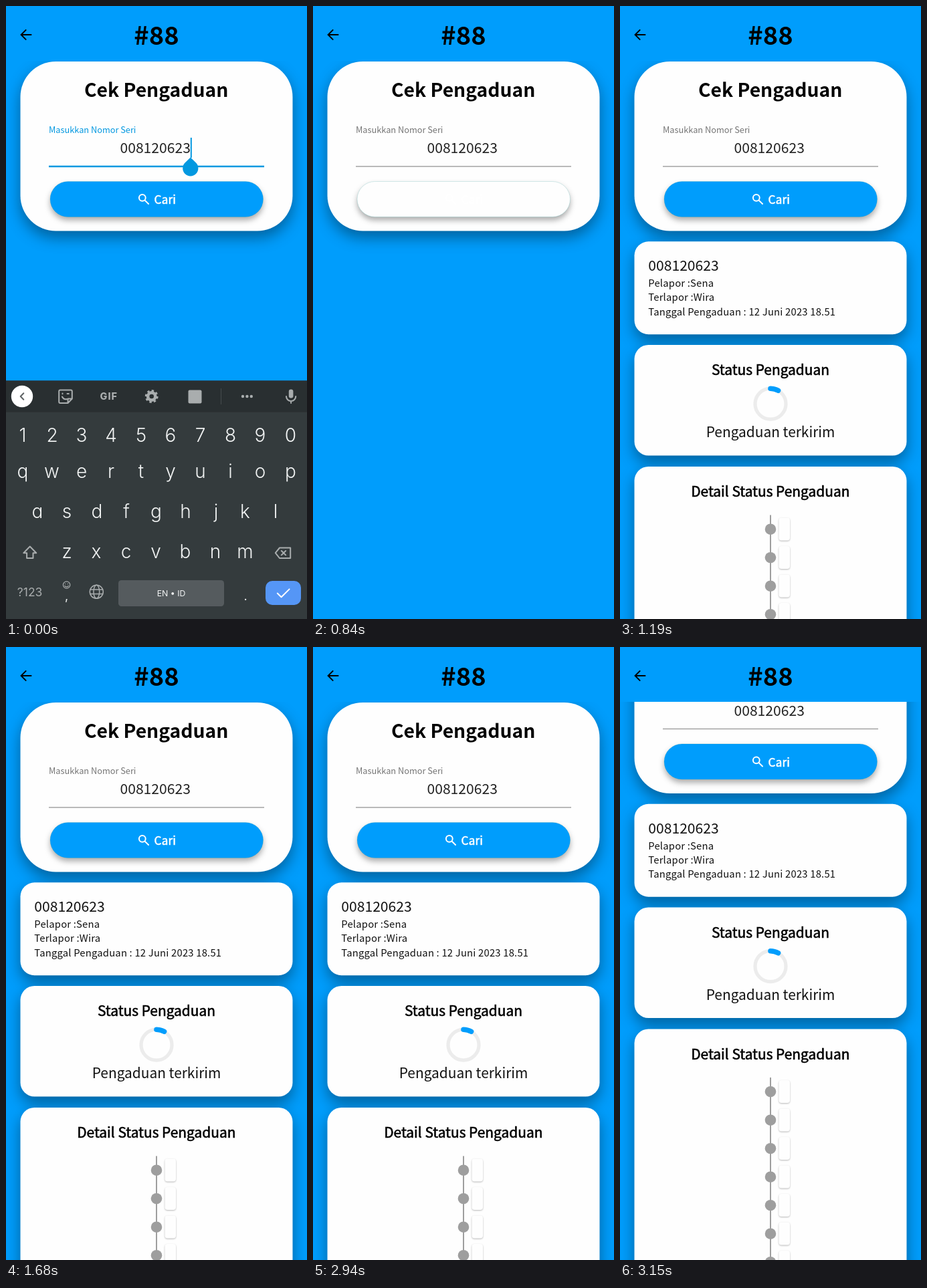
These frames come from a looping animation (450x917 px, 3.22 s). An HTML page:

```html
<!DOCTYPE html>
<html lang="id">
<head>
<meta charset="utf-8">
<title>Cek Pengaduan</title>
<style>
  :root {
    --blue: #009dfc;
    --accent: #0398e0;
    --card: #fefefe;
    --icon: #a9adae;
    --loop: 3220ms linear infinite;
  }
  html, body { margin: 0; width: 100%; height: 100%; overflow: hidden; background: var(--blue); }
  svg.stage { display: block; width: 100vw; height: 100vh; }
  text { font-family: "Noto Sans CJK JP", "Noto Sans CJK SC", "Noto Sans CJK KR", "Noto Sans CJK TC", "Noto Sans", sans-serif; fill: #111; }
  .mid { text-anchor: middle; }
  .bold { font-weight: 700; fill: #000; }
  .semi { stroke: #000; stroke-width: .6px; fill: #000; }
  .h { font-size: 20.9px; }
  .num { font-size: 21.1px; }
  .row { font-size: 14.8px; letter-spacing: .2px; }
  .line { fill: none; stroke-linecap: round; stroke-linejoin: round; }
  .card { fill: var(--card); filter: url(#deep); }

  .keys text { font-family: Inter, Roboto, sans-serif; font-feature-settings: "cv11"; fill: #f1f3f3; text-anchor: middle; }
  .keys .big { font-size: 28px; font-weight: 300; }
  .ico { fill: none; stroke: var(--icon); stroke-width: 2; stroke-linecap: round; stroke-linejoin: round; }
  .solid { fill: var(--icon); }

  .caret { animation: caret var(--loop); }
  .label { font-size: 12.75px; animation: label var(--loop); }
  .under { animation: under var(--loop); }
  .button { animation: button var(--loop); }
  .ripple { fill: #fff; animation: ripple var(--loop); }
  .keys { animation: slide var(--loop); }
  .results { animation: results var(--loop); }
  .page { animation: scroll var(--loop); }

  @keyframes caret {
    0%, 17.38% { visibility: visible; }
    17.39%, 100% { visibility: hidden; }
  }
  @keyframes label {
    0%, 21.74% { fill: var(--accent); }
    26.08%, 100% { fill: #757575; }
  }
  @keyframes under {
    0%, 21.74% { stroke: var(--accent); stroke-width: 2.4px; }
    26.08%, 100% { stroke: #a2a2a2; stroke-width: 1.6px; }
  }
  @keyframes button {
    0%, 21.74% { fill: var(--blue); }
    26.08%, 36.94% { fill: var(--card); }
    36.95%, 100% { fill: var(--blue); }
  }
  @keyframes ripple {
    0%, 16.5% { r: 0px; opacity: .4; }
    21.74% { r: 70px; opacity: .4; }
    26.08%, 100% { r: 150px; opacity: 0; }
  }
  @keyframes slide {
    0%, 19.56% { transform: translateY(0); }
    21.74% { transform: translateY(89.5px); }
    26.08%, 100% { transform: translateY(358px); }
  }
  @keyframes results {
    0%, 36.94% { visibility: hidden; }
    36.95%, 100% { visibility: visible; }
  }
  @keyframes scroll {
    0%, 91.3% { transform: translateY(0); animation-timing-function: cubic-bezier(.35, .1, .75, .85); }
    97.82%, 100% { transform: translateY(-117.5px); }
  }
</style>
</head>
<body>
<svg class="stage" viewBox="0 0 450 917" preserveAspectRatio="none">
  <defs>
    <filter id="deep" filterUnits="userSpaceOnUse" x="-40" y="20" width="530" height="1180" color-interpolation-filters="sRGB">
      <feDropShadow dx="0" dy="10" stdDeviation="11" flood-color="#000" flood-opacity=".38"/>
    </filter>
    <filter id="soft" filterUnits="userSpaceOnUse" x="40" y="240" width="370" height="110" color-interpolation-filters="sRGB">
      <feDropShadow dx="0" dy="5" stdDeviation="4.5" flood-color="#000" flood-opacity=".32"/>
    </filter>
    <filter id="faint" x="-40%" y="-20%" width="180%" height="150%" color-interpolation-filters="sRGB">
      <feDropShadow dx="0" dy="1" stdDeviation=".9" flood-color="#000" flood-opacity=".28"/>
    </filter>
    <clipPath id="body"><rect y="82" width="450" height="835"/></clipPath>
    <clipPath id="pill"><rect x="66" y="262.5" width="318.5" height="53" rx="26.5"/></clipPath>
    <g id="step">
      <circle cx="225" cy="782.7" r="8.3" fill="#9e9e9e"/>
      <rect x="237.5" y="765.5" width="16.5" height="34" rx="4" fill="#fefefe" filter="url(#faint)"/>
    </g>
  </defs>

  <rect width="450" height="917" fill="#009dfc"/>

  <g clip-path="url(#body)">
    <g class="page">
      <rect class="card" x="21.5" y="83" width="407" height="253.5" rx="53"/>
      <text class="bold mid" x="224.7" y="136" font-size="28.3">Cek Pengaduan</text>
      <text class="label" x="64" y="189.6">Masukkan Nomor Seri</text>
      <text class="num mid" x="223.2" y="220" style="fill:#222">008120623</text>
      <path class="under" d="M64 240H386"/>
      <g class="caret" fill="#0398e0">
        <rect x="275.8" y="197" width="2" height="30"/>
        <path d="M275.8 226.4L284 234.6A11.6 11.6 0 1 1 267.6 234.6Z"/>
      </g>

      <g filter="url(#soft)">
        <rect class="button" x="66" y="262.5" width="318.5" height="53" rx="26.5" stroke="#2c9a9a" stroke-opacity=".25" stroke-width=".8"/>
      </g>
      <g class="line" stroke="#fff" stroke-width="2">
        <circle cx="203.8" cy="286.8" r="4.9"/>
        <path d="M207.5 290.6L213 296"/>
      </g>
      <text x="221.6" y="296" font-size="17" letter-spacing=".2" style="fill:#fff;stroke:#fff;stroke-width:.6px">Cari</text>
      <g clip-path="url(#pill)"><circle class="ripple" cx="314" cy="288.5"/></g>

      <g class="results">
        <rect class="card" x="21.5" y="352.3" width="407" height="138.9" rx="21"/>
        <text class="num" x="42.3" y="396.3">008120623</text>
        <text class="row" x="42.3" y="420">Pelapor :Sena</text>
        <text class="row" x="42.3" y="441.3">Terlapor :Wira</text>
        <text class="row" x="42.3" y="462.6">Tanggal Pengaduan : 12 Juni 2023 18.51</text>

        <rect class="card" x="21.5" y="507" width="407" height="165.5" rx="21"/>
        <text class="h semi mid" x="225" y="552">Status Pengaduan</text>
        <circle cx="225" cy="595.2" r="23" fill="none" stroke="#ececec" stroke-width="5.2"/>
        <path class="line" d="M225 572.2A23 23 0 0 1 236.5 575.3" stroke="#009dfc" stroke-width="7.6"/>
        <text class="h mid" x="225" y="645.2">Pengaduan terkirim</text>

        <rect class="card" x="21.5" y="689" width="407" height="460" rx="21"/>
        <text class="h semi mid" x="224.8" y="734">Detail Status Pengaduan</text>
        <path d="M225 761.5V1100" stroke="#9e9e9e" stroke-width="2"/>
        <use href="#step"/>
        <use href="#step" y="42.5"/>
        <use href="#step" y="85"/>
        <use href="#step" y="127.5"/>
        <use href="#step" y="170"/>
        <use href="#step" y="212.5"/>
        <use href="#step" y="255"/>
      </g>
    </g>
  </g>

  <path d="M38.3 43H22.8M30.2 35.4L22.6 43L30.2 50.6" fill="none" stroke="#000" stroke-width="2"/>
  <text class="bold mid" x="225" y="58" font-size="38">#88</text>

  <g class="keys">
    <rect y="560.5" width="450" height="357" fill="#343b3d"/>
    <rect y="560.5" width="450" height="47" fill="#292f31"/>

    <circle cx="24" cy="584" r="16.2" fill="#fff"/>
    <path class="line" d="M26.3 579.3L21.7 584L26.3 588.7" stroke="#5f6365" stroke-width="2"/>
    <g class="ico">
      <path d="M81 574.5H97Q98.8 574.5 98.8 576.5V587.5L92.5 594H81Q79.2 594 79.2 592V576.5Q79.2 574.5 81 574.5ZM98.5 587.5H92.5V593.5"/>
      <path d="M84 584.5Q86 589 91 588M84.5 579.5V580.3M91.5 580H93.8"/>
    </g>
    <text x="153.8" y="589" font-size="14.4" font-weight="800" letter-spacing="1" style="fill:var(--icon)">GIF</text>
    <g fill="none" stroke="#a9adae">
      <circle cx="217.7" cy="584" r="5.6" stroke-width="4.6"/>
      <circle cx="217.7" cy="584" r="8.4" stroke-width="3" pathLength="16" stroke-dasharray="1 1"/>
    </g>
    <rect class="solid" x="272.5" y="574.5" width="20" height="20" rx="2"/>
    <path d="M321.5 572V596" stroke="#454b4d"/>
    <g class="solid">
      <circle cx="354" cy="584" r="2.2"/><circle cx="360.4" cy="584" r="2.2"/><circle cx="366.8" cy="584" r="2.2"/>
      <rect x="422.8" y="573.5" width="6.6" height="13" rx="3.3"/>
    </g>
    <path class="ico" d="M419 584A7.1 7.1 0 0 0 433.2 584M426.1 591.5V594"/>

    <g class="big">
      <text x="25 69 113 157 202 246 290.5 335.5 380 425.5" y="651.5">1234567890</text>
      <text x="25 68.5 113 157 202 246 290.5 335.5 380 425.5" y="706">qwertyuiop</text>
      <text x="47 91 136 180 224.5 268.5 314 357.5 403" y="765.5">asdfghjkl</text>
      <text x="91 135 179.5 224 268 313 357.5" y="825.5">zxcvbnm</text>
    </g>
    <g class="ico" stroke-width="1.8">
      <path d="M35.8 808.5L45.3 818.3H40.5V826H31.1V818.3H26.3Z"/>
      <path d="M409 810.5H425.2V826H409L402.8 818.2ZM411.8 815L418.2 821.4M418.2 815L411.8 821.4"/>
    </g>

    <text x="35.6" y="883" font-size="17.5" style="fill:var(--icon)">?123</text>
    <g class="ico" style="stroke-width:1.2px">
      <circle cx="90.6" cy="866" r="5.2"/>
      <path d="M87.8 867.3Q90.6 870.6 93.4 867.3M88.7 864.3V864.6M92.5 864.3V864.6"/>
    </g>
    <text x="90.5" y="888.5" font-size="18">,</text>
    <g class="ico" style="stroke-width:1.5px">
      <circle cx="135.3" cy="876.3" r="10"/>
      <ellipse cx="135.3" cy="876.3" rx="4.4" ry="10"/>
      <path d="M126 873H144.6M126 879.6H144.6"/>
    </g>
    <rect x="168" y="859" width="158" height="39" rx="4.5" fill="#555b5e"/>
    <text x="247" y="882.7" font-size="12.3">EN • ID</text>
    <text x="358" y="888.5" font-size="18">.</text>
    <rect x="388" y="860" width="53" height="36" rx="10" fill="#5596f6"/>
    <path class="line" d="M405.8 878.5L411.6 884.3L423.6 872.4" stroke="#fff" stroke-width="2"/>
  </g>
</svg>
<script>
  // Hold every pose for one 70 ms tick.
  const TICK = 70, LOOP = 3220;
  const anims = document.getAnimations();
  const start = performance.now();
  anims.forEach(a => a.pause());

  function draw() {
    const t = (performance.now() - start) % LOOP;
    const pose = Math.floor(t / TICK) * TICK;
    anims.forEach(a => { a.currentTime = pose; });
    requestAnimationFrame(draw);
  }
  draw();
</script>
</body>
</html>
```
